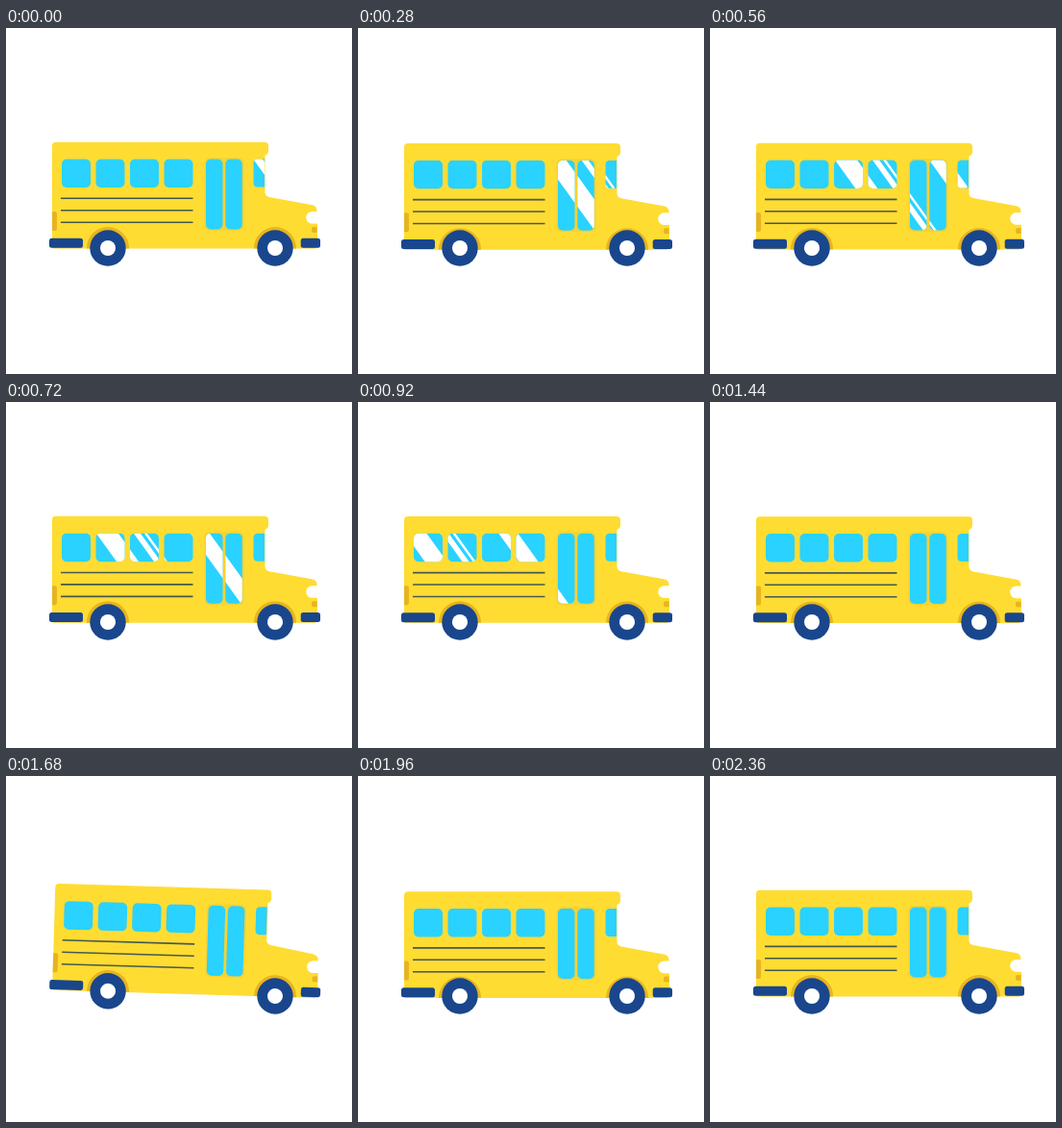
Write an HTML page that moves like this. It is 360 by 360 pixels and loops after 2.4 s.

```html
<!DOCTYPE html>
<html lang="en">
<head>
<meta charset="utf-8">
<title>School bus</title>
<style>
  html, body { margin: 0; width: 100%; height: 100%; overflow: hidden; background: #fff; }
  svg { display: block; width: 100vw; height: 100vh; }
</style>
</head>
<body>
<svg viewBox="0 0 360 360">
  <defs>
    <g id="panes">
      <rect x="58" y="136.5" width="30" height="29.5" rx="5"/>
      <rect x="93.5" y="136.5" width="30" height="29.5" rx="5"/>
      <rect x="129" y="136.5" width="30" height="29.5" rx="5"/>
      <rect x="164.5" y="136.5" width="30" height="29.5" rx="5"/>
      <rect x="208" y="136.5" width="17.5" height="73" rx="5"/>
      <rect x="228.3" y="136.5" width="17.5" height="73" rx="5"/>
      <path d="M269 136.5V165.5H262Q257.5 165.5 257.5 161V141Q257.5 136.5 262 136.5Z"/>
    </g>
    <clipPath id="glass">
      <rect x="58" y="136.5" width="30" height="29.5" rx="5"/>
      <rect x="93.5" y="136.5" width="30" height="29.5" rx="5"/>
      <rect x="129" y="136.5" width="30" height="29.5" rx="5"/>
      <rect x="164.5" y="136.5" width="30" height="29.5" rx="5"/>
      <rect x="208" y="136.5" width="17.5" height="73" rx="5"/>
      <rect x="228.3" y="136.5" width="17.5" height="73" rx="5"/>
      <rect x="257.5" y="136.5" width="11.5" height="29" rx="4"/>
    </clipPath>
    <g id="wheel">
      <circle r="18.7" fill="#19468c"/>
      <circle r="8" fill="#fff"/>
    </g>
  </defs>
  <g id="bus">
    <g id="body">
      <path fill="#ffdc32" d="M52 118.7H269Q273 118.7 273 122.5V128Q273 131 269.5 132.5V171Q269.5 175 274 176L318 184Q324 185 323.5 191L324 205V229.5H48V122.5Q48 118.7 52 118.7Z"/>
      <path fill="#fff" d="M324.5 191H318.5A6.3 6.3 0 0 0 318.5 203.6H324.5Z"/>
      <path fill="#e6b422" d="M48 191H51Q53 191 53 193V209Q53 211 51 211H48ZM323.5 207H320Q318 207 318 209V211Q318 213 320 213H323.5Z"/>
      <path fill="#e6b422" d="M84 229.5V229A22 22 0 0 1 128 229V229.5ZM258 229.5V229A22 22 0 0 1 302 229V229.5Z"/>
      <path stroke="#45594f" stroke-width="1.6" d="M57 177.3H194.5M57 189.7H194.5M57 202.2H194.5"/>
      <rect x="206.5" y="135" width="41" height="76" rx="5" fill="#f7d232"/>
      <use href="#panes" fill="#2ad2ff"/>
      <g clip-path="url(#glass)">
        <g id="shine" fill="#fff"></g>
      </g>
      <path fill="#fff" d="M44 219H49V230H44ZM322 219H328V230H322Z"/>
      <rect x="45" y="218.8" width="35" height="10" rx="2.5" fill="#19468c"/>
      <rect x="306.7" y="218.8" width="20.3" height="10" rx="2.5" fill="#19468c"/>
    </g>
    <use href="#wheel" x="106" y="229"/>
    <use href="#wheel" x="280" y="229"/>
  </g>
</svg>
<script>
  const LOOP = 2400;
  const [bus, body, shine] = ['bus', 'body', 'shine'].map(id => document.getElementById(id));

  // Slanted reflections: left edge and width, measured at y = 151
  const bands = [[0, 23], [39, 7], [50, 3], [98, 20]];
  shine.innerHTML = bands.map(([x, w]) =>
    `<path d="M${x - 14.4} 131h${w}l61.2 85h${-w}Z"/>`).join('');

  const bump = (t, peak, half) =>
    Math.abs(t - peak) < half ? Math.cos((t - peak) / half * Math.PI / 2) ** 2 : 0;

  function draw(now) {
    const t = now % LOOP;
    const bob = 0.8 * (1 - Math.cos(t / 800 * 2 * Math.PI));
    const frontLift = -1.75 * bump(t, 1140, 200);
    const rearLift = 1.75 * bump(t, 1700, 220);

    bus.setAttribute('transform', `rotate(${frontLift} 106 229) rotate(${rearLift} 280 229)`);
    body.setAttribute('transform', `translate(0 ${bob})`);
    shine.setAttribute('transform', `translate(${268 - 0.227 * t} 0)`);
    shine.setAttribute('visibility', t < 1400 ? 'visible' : 'hidden');
    requestAnimationFrame(() => draw(performance.now()));
  }
  draw(performance.now());
</script>
</body>
</html>
```
